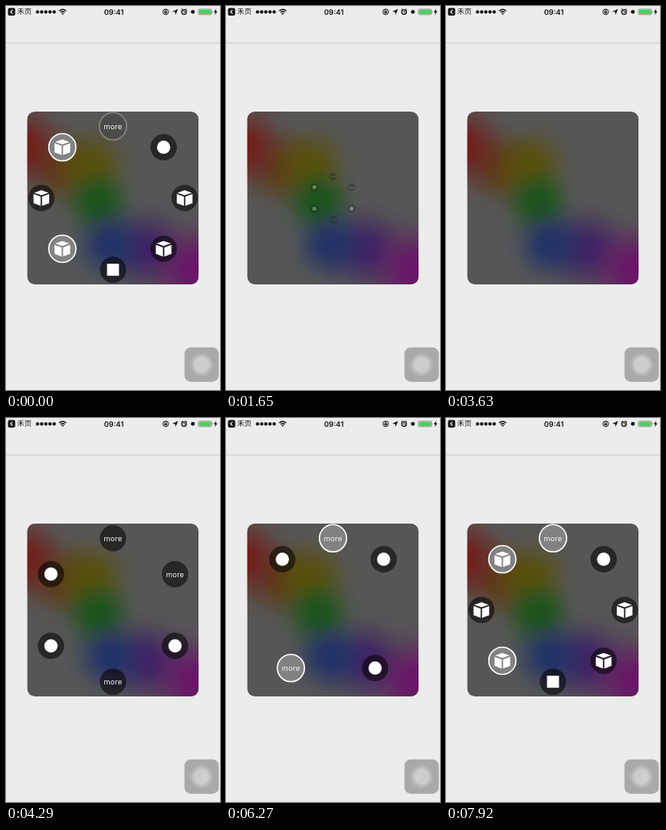
Write an HTML page that moves like this. It is 268x480 px and loops after 8 s.

```html
<!DOCTYPE html>
<html lang="en">
<head>
<meta charset="utf-8">
<title>Radial menu</title>
<style>
  html, body { margin: 0; width: 100%; height: 100%; overflow: hidden; background: #ececec; }
  svg { position: fixed; inset: 0; width: 100%; height: 100%; display: block; }
  text {
    font-family: Inter, "Noto Sans CJK SC", "Noto Sans CJK", sans-serif;
    text-rendering: geometricPrecision;
  }
  .more { font-size: 9.2px; letter-spacing: .15px; fill: #f4f4f4; text-anchor: middle; }
</style>
</head>
<body>
<svg viewBox="0 0 268 480" xmlns="http://www.w3.org/2000/svg">
  <defs>
    <clipPath id="panel"><rect x="26.7" y="132" width="214.4" height="216" rx="9.5"/></clipPath>
    <g id="box" fill="#fff">
      <path d="M0-9.8 9-6.6 0-3.5-9-6.6Z"/>
      <path d="M-9.8-5-.9-1.8V9.8L-9.8 6.4Z"/>
      <path d="M9.8-5 .9-1.8V9.8L9.8 6.4Z"/>
    </g>
    <circle id="disc" r="8.3" fill="#fff"/>
    <rect id="tile" x="-7.5" y="-7.5" width="15" height="15" fill="#fff"/>
    <text id="more" class="more" y="3.4">more</text>
  </defs>

  <rect width="268" height="480" fill="#ececec"/>
  <path d="M0 46.2H268" stroke="#c9c9c9" stroke-width="1"/>

  <g id="status" fill="#111">
    <rect x="2.5" y="2.5" width="9" height="9.5" rx="2"/>
    <path d="M8.2 4.8 5.8 7.2 8.2 9.6" fill="none" stroke="#fff" stroke-width="1.2"/>
    <text x="14" y="10.4" font-size="9">禾页</text>
    <g id="signal"></g>
    <path d="M66.6 6.2Q71 2.2 75.4 6.2M68.4 8.1Q71 5.7 73.6 8.1" fill="none" stroke="#111" stroke-width="1.4"/>
    <path d="M69.5 9.4Q71 8 72.5 9.4L71 11.1Z"/>
    <text x="135" y="10.6" font-size="9.2" font-weight="600" text-anchor="middle">09:41</text>
    <g fill="none" stroke="#111" stroke-width="1">
      <circle cx="200" cy="7.3" r="3.5"/>
      <path d="M199 7V6a1 1 0 0 1 2 0V7" stroke-width=".8"/>
      <circle cx="223" cy="7.6" r="2.9" stroke-width="1.3"/>
      <path d="M219.5 4.8 221.2 3.4M226.5 4.8 224.8 3.4M223 5.8V7.8H224.5"/>
      <rect x="241" y="4" width="16.5" height="6.8" rx="1.4" stroke="#777" stroke-width=".8"/>
    </g>
    <rect x="198.4" y="6.9" width="3.2" height="2.3"/>
    <path d="M215.5 3.7 212.4 11 211.8 7.5 208.3 6.9Z"/>
    <circle cx="234" cy="7.3" r="2.4"/>
    <rect x="241.8" y="4.8" width="14.9" height="5.2" rx=".8" fill="#4fce62"/>
    <path d="M258.4 6.1V8.7Q259.6 7.4 258.4 6.1Z" fill="#777"/>
    <path d="M263.3 3.2 260.2 7.9H262.2L261.4 11.5 264.8 6.5H262.8Z"/>
  </g>

  <g clip-path="url(#panel)">
    <rect x="26" y="131" width="217" height="218" fill="#565656"/>
    <g id="glow"></g>
  </g>
  <g id="menu"></g>

  <g>
    <rect x="223.5" y="426.7" width="43" height="43" rx="8" fill="#a9a9a9"/>
    <circle cx="245" cy="448.4" r="14.5" fill="#b2b2b2"/>
    <circle cx="245" cy="448.4" r="12.3" fill="#bebebe"/>
    <circle cx="245" cy="448.4" r="9.8" fill="#cdcdcd"/>
  </g>
</svg>

<script>
const LOOP = 8000, STEP = 330, RADIUS = 89.7;
const find = id => document.getElementById(id);

function add(parent, tag, attrs) {
  const node = document.createElementNS("http://www.w3.org/2000/svg", tag);
  for (const name in attrs) node.setAttribute(name, attrs[name]);
  return parent.appendChild(node);
}

for (let i = 0; i < 5; i++) add(find("signal"), "circle", { cx: 39.5 + i * 5.2, cy: 7.4, r: 2.1 });

// Soft colour spots: x, y, radius, colour
[
  [70, 204, 60, "#5c3a18"], [22, 176, 68, "#721b16"],
  [106, 200, 62, "#595008"], [116, 246, 56, "#175417"],
  [176, 304, 66, "#3d1f66"], [130, 298, 58, "#1d3068"],
  [238, 330, 76, "#6a1068"]
].forEach(([cx, cy, r, color], i) => {
  const fade = add(find("glow"), "radialGradient", { id: "glow" + i });
  [[0, .95], [.25, .82], [.5, .45], [.75, .12], [1, 0]].forEach(([offset, opacity]) =>
    add(fade, "stop", { offset, "stop-color": color, "stop-opacity": opacity }));
  add(find("glow"), "circle", { cx, cy, r, fill: `url(#glow${i})` });
});

// Items: clockwise angle from the top, icon, permanently selected
const pages = {
  eight: [
    [0, "more"], [45, "disc"], [90, "box"], [135, "box"],
    [180, "tile"], [225, "box", 1], [270, "box"], [315, "box", 1]
  ],
  five: [[0, "more"], [45, "disc"], [144, "disc"], [216, "more", 1], [315, "disc"]],
  six: [[0, "more"], [60, "more"], [120, "disc"], [180, "more"], [240, "disc"], [300, "disc"]]
};

function makeItem(layer, [angle, icon, selected]) {
  const group = add(layer, "g", {});
  const dark = add(group, "circle", { r: 16.5, fill: "#000", "fill-opacity": .55 });
  const bright = add(group, "circle", { r: 17, fill: "#828282", stroke: "#fff", "stroke-width": 1.6 });
  add(group, "use", { href: "#" + icon });
  return { angle, selected: selected || 0, group, dark, bright };
}

const layers = {};
for (const name in pages) {
  const layer = add(find("menu"), "g", {});
  layers[name] = { layer, items: pages[name].map(spec => makeItem(layer, spec)) };
}

// Steps: first tick, page, openness, tapped angle, tap strength
const steps = [
  [0, "eight", 1, 0, .3], [1, "five", .6],
  [2, "five", 1], [3, "five", .5],
  [4, "six", 0], [5, "six", .3], [6, "six", .8],
  [7, "six", 1], [10, "six", .5], [11, "six", 0], [12, "six", .6],
  [13, "six", 1], [15, "six", 1, 180, 1], [16, "six", .4, 180, 1],
  [17, "five", .6], [18, "five", 1], [19, "five", 1, 0, 1],
  [21, "five", .4, 0, 1], [22, "eight", .6], [23, "eight", 1], [24, "eight", 1, 0, 1]
];

function draw(time) {
  const tick = Math.floor(time % LOOP / STEP);
  const [, page, open, tapped, strength] = steps.filter(step => step[0] <= tick).pop();
  for (const name in layers) {
    const { layer, items } = layers[name];
    const shown = name === page && open > 0;
    layer.setAttribute("display", shown ? "inline" : "none");
    if (!shown) continue;
    layer.setAttribute("opacity", open);
    for (const item of items) {
      const a = item.angle * Math.PI / 180, reach = RADIUS * open;
      const x = 134 + Math.sin(a) * reach, y = 240 - Math.cos(a) * reach;
      const glow = item.angle === tapped ? strength : item.selected;
      item.group.setAttribute("transform", `translate(${x} ${y}) scale(${open})`);
      item.dark.setAttribute("opacity", 1 - glow);
      item.bright.setAttribute("opacity", glow);
    }
  }
}

const start = performance.now();
function frame() {
  draw(performance.now() - start);
  requestAnimationFrame(frame);
}
frame();
</script>
</body>
</html>
```
